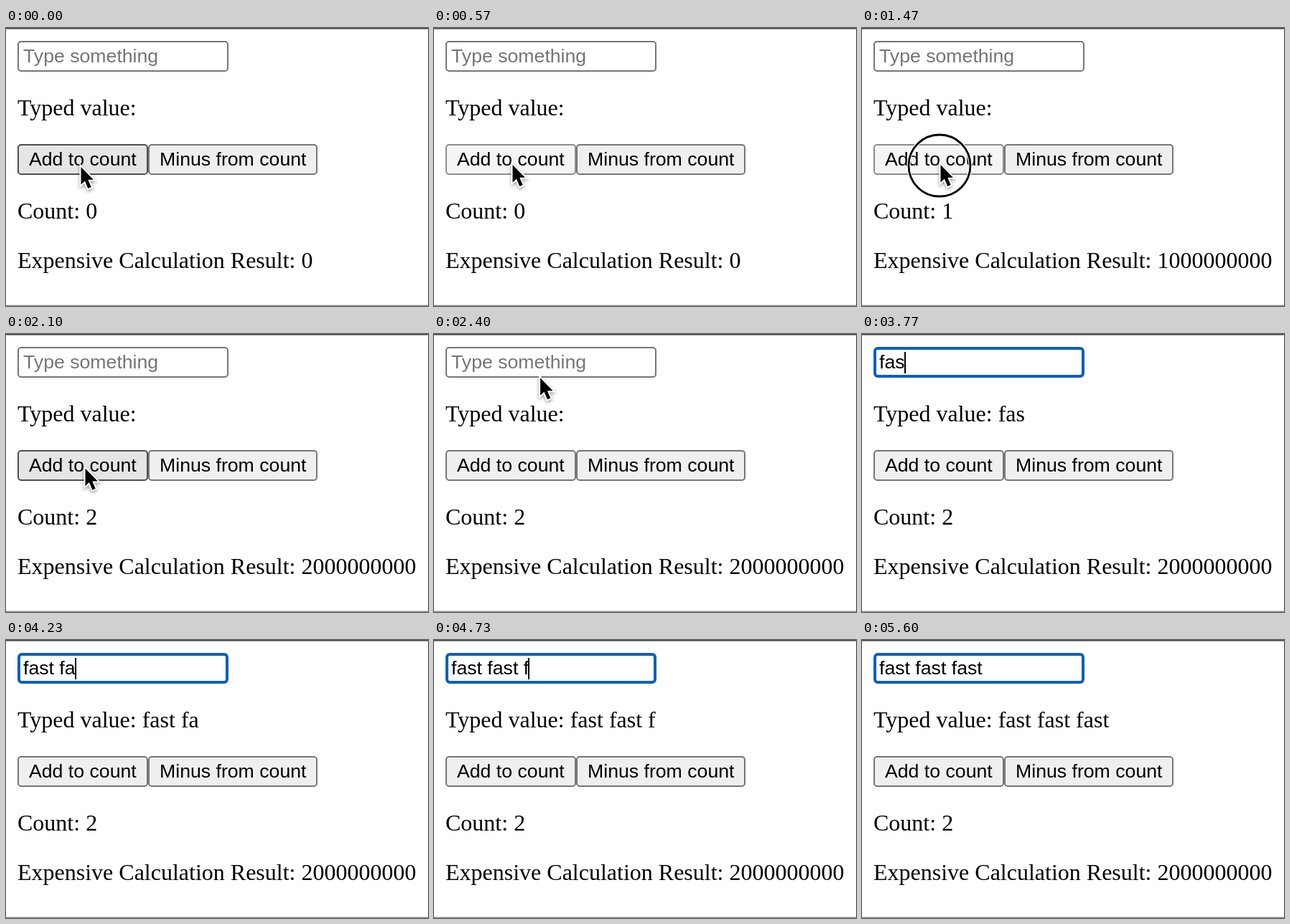
An HTML page with a canvas for the animation above (6070 ms loop, 588 by 388 pixels).

```html
<!DOCTYPE html>
<html lang="en">
<head>
<meta charset="utf-8">
<title>Counter and input</title>
<style>
html, body { margin: 0; width: 100%; height: 100%; overflow: hidden; background: #fff; }
canvas { display: block; width: 588px; height: 388px; }
</style>
</head>
<body>
<canvas id="stage"></canvas>
<script>
const W = 588, H = 388, LOOP = 6070;
const SERIF = '32px "Liberation Serif", Times, serif';
const SANS = '26.667px "Liberation Sans", Arial, sans-serif';
const TYPED = 'fast fast fast';
const KEYS = [3530, 3630, 3770, 3870, 4030, 4130, 4230, 4330, 4500, 4600, 4730, 4870, 5000, 5100];
const ARROW = [[0, 0], [0, 24.5], [5.4, 19.4], [9.8, 30], [14.2, 28.1], [9.8, 17.8], [17.4, 17.8]];

const canvas = document.getElementById('stage');
const ctx = canvas.getContext('2d');
const ratio = window.devicePixelRatio || 1;
canvas.width = W * ratio;
canvas.height = H * ratio;

const within = (t, a, b) => t >= a && t < b;
const mix = (a, b, k) => a + (b - a) * k;

function ease(t, a, b) {
  const k = Math.min(1, Math.max(0, (t - a) / (b - a)));
  return k * k * k * (k * (k * 6 - 15) + 10);
}

function text(str, x, y, font, color = '#000') {
  ctx.font = font;
  ctx.fillStyle = color;
  ctx.fillText(str, x, y);
}

function box(x, y, w, h, line, fill, stroke) {
  ctx.beginPath();
  ctx.roundRect(x + line / 2, y + line / 2, w - line, h - line, 4);
  ctx.fillStyle = fill;
  ctx.fill();
  ctx.lineWidth = line;
  ctx.strokeStyle = stroke;
  ctx.stroke();
}

function button(label, x, w, state) {
  const [fill, stroke] = {
    idle: ['#efefef', '#767676'],
    hover: ['#e5e5e5', '#4f4f4f'],
    active: ['#f5f5f5', '#8d8d8d']
  }[state];
  box(x, 162, w, 43, 2, fill, stroke);
  text(label, x + 16, 192, SANS);
}

function pointer(t) {
  const a = ease(t, 30, 400), b = ease(t, 2030, 2530);
  return {
    x: mix(mix(104.5, 109.5, a), 153, b),
    y: mix(mix(194, 191, a), 45, b)
  };
}

function arrow(x, y) {
  ctx.save();
  ctx.translate(x, y);
  ctx.beginPath();
  ARROW.forEach(p => ctx.lineTo(...p));
  ctx.closePath();
  ctx.lineJoin = 'miter';
  ctx.lineWidth = 4;
  ctx.strokeStyle = '#fff';
  ctx.shadowColor = 'rgba(0,0,0,.4)';
  ctx.shadowBlur = 4 * ratio;
  ctx.shadowOffsetY = 2 * ratio;
  ctx.stroke();
  ctx.shadowColor = 'transparent';
  ctx.fillStyle = '#000';
  ctx.fill();
  ctx.restore();
}

function outlined(outer, inner) {
  for (const [width, color] of [[outer, '#fff'], [inner, '#000']]) {
    ctx.lineWidth = width;
    ctx.strokeStyle = color;
    ctx.stroke();
  }
}

function beam(x, y) {
  ctx.beginPath();
  for (const s of [-1, 1]) {
    ctx.moveTo(x - 6.5, y + 14 * s);
    ctx.quadraticCurveTo(x, y + 14 * s, x, y + 9 * s);
    ctx.quadraticCurveTo(x, y + 14 * s, x + 6.5, y + 14 * s);
  }
  ctx.moveTo(x, y - 10);
  ctx.lineTo(x, y + 10);
  ctx.moveTo(x - 3.5, y + 4);
  ctx.lineTo(x + 3.5, y + 4);
  outlined(5, 2.2);
}

function ring(x, y, r) {
  ctx.beginPath();
  ctx.arc(x, y, r, 0, Math.PI * 2);
  outlined(5, 2.8);
}

function clickRadius(t) {
  if (within(t, 430, 500) || within(t, 1470, 1530)) return 43;
  if (within(t, 500, 570) || within(t, 1530, 1570) || within(t, 2630, 2730)) return 33.5;
  return 0;
}

function draw(t) {
  const p = pointer(t);
  const count = t < 970 ? 0 : t < 2030 ? 1 : 2;
  const value = TYPED.slice(0, KEYS.filter(k => t >= k).length);
  const focus = t >= 2670;
  const pressed = within(t, 430, 970) || within(t, 1470, 2030);

  ctx.setTransform(ratio, 0, 0, ratio, 0, 0);
  ctx.fillStyle = '#fff';
  ctx.fillRect(0, 0, W, H);
  ctx.fillStyle = '#484848';
  ctx.fillRect(0, 0, W, 1.6);
  ctx.fillStyle = '#858585';
  ctx.fillRect(0, 386.7, W, 1.3);

  box(16, 18, 294, 43, focus ? 4 : 2, '#fff', focus ? '#0a5fbe' : '#767676');
  text(value || 'Type something', 24, 48, SANS, value ? '#000' : '#757575');
  const caret = within(t, 2670, 3170) || within(t, 3530, 5600);
  if (caret) {
    const end = 24 + ctx.measureText(value).width;
    ctx.fillStyle = '#000';
    ctx.fillRect(Math.max(24, Math.floor(end - 0.5)), 25, 2, 30);
  }

  text('Typed value: ' + value, 16, 122, SERIF);
  button('Add to count', 16, 182, pressed ? 'active' : p.y > 163 ? 'hover' : 'idle');
  button('Minus from count', 198, 236, 'idle');
  text('Count: ' + count, 16, 266, SERIF);
  text('Expensive Calculation Result: ' + count * 1e9, 16, 335, SERIF);

  const r = clickRadius(t);
  if (r) ring(p.x - (focus || t > 2600 ? 0 : 1.5), p.y + (t > 2600 ? 0 : 1), r);
  if (t < 3530) (p.y < 60 ? beam : arrow)(p.x, p.y);
}

const start = performance.now();
function tick() {
  draw((performance.now() - start) % LOOP);
  requestAnimationFrame(tick);
}
tick();
</script>
</body>
</html>
```
